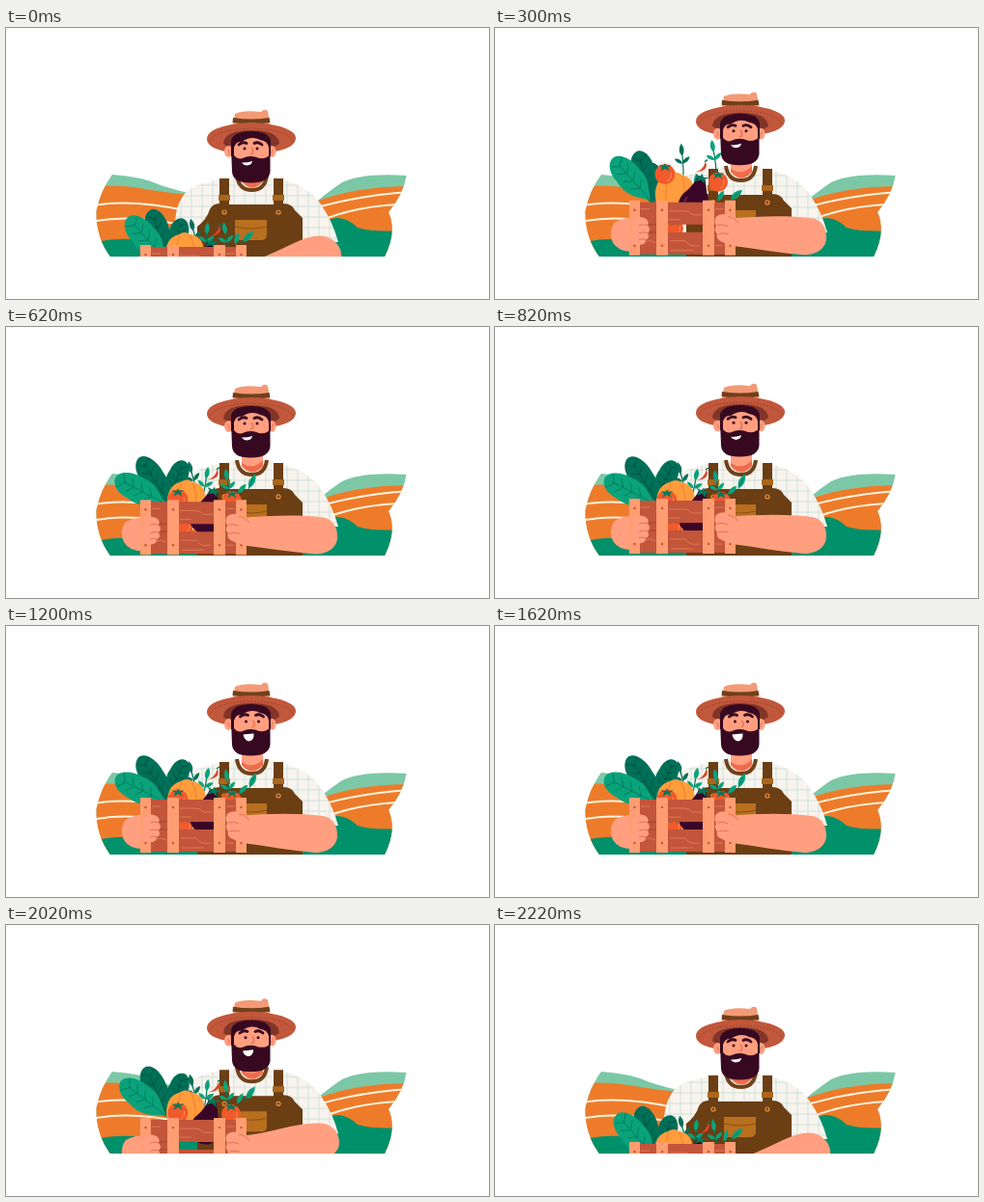
An HTML page that plays this animation: 500 by 281 pixels, repeating every 2420 ms.

```html
<!DOCTYPE html>
<html lang="en">
<head>
<meta charset="utf-8">
<title>Farmer with a crate</title>
<style>
  html, body { margin: 0; width: 100%; height: 100%; overflow: hidden; background: #fff; }
  svg { display: block; width: 100vw; height: 100vh; }
</style>
</head>
<body>
<svg viewBox="0 0 500 281">
  <defs>
    <clipPath id="ground"><rect width="500" height="237"/></clipPath>
    <clipPath id="leftField"><path d="M110 152Q141 154 160 163Q200 176 230 176V237H108Q93 217 93.500 190Q98 168 110 152Z"/></clipPath>
    <clipPath id="rightField"><path d="M240 237V190H310Q330 172 348 160Q370 150 414.500 153Q412 171 396 191Q405 211 392 237Z"/></clipPath>
    <pattern id="check" width="11" height="11" x="177" y="158" patternUnits="userSpaceOnUse">
      <rect width="11" height="11" fill="#f8f4ed"/>
      <path d="M4 0V11M0 5H11" stroke="#cbdedb" stroke-width=".9"/>
    </pattern>
  </defs>

  <g clip-path="url(#ground)">
    <g clip-path="url(#leftField)">
      <path d="M80 140H240V240H80Z" fill="#7cc8a6"/>
      <path d="M80 165Q115 161 150 168Q190 174 230 176V240H80Z" fill="#ee7b2a"/>
      <path d="M90 184Q130 177 190 190M88 201Q130 192 190 206" fill="none" stroke="#fff3dc" stroke-width="2"/>
      <path d="M80 225Q112 216 140 220Q180 215 230 215V240H80Z" fill="#00906a"/>
    </g>
    <g clip-path="url(#rightField)">
      <path d="M240 140H420V240H240Z" fill="#7cc8a6"/>
      <path d="M240 195L318 181Q362 164 420 164V240H240Z" fill="#ee7b2a"/>
      <path d="M300 193Q355 174 420 170M310 207Q350 186 405 183" fill="none" stroke="#fff3dc" stroke-width="2"/>
      <path d="M240 215H315Q329 197 344 197Q355 198 364 207Q380 212 410 210V240H240Z" fill="#00906a"/>
    </g>

    <g id="torso">
      <path d="M236 154Q204 159 190 167Q177 177 175 200V225H200V255H307V222H344Q338 200 326 183Q314 165 289 158L272 154Z" fill="url(#check)"/>
      <path d="M244 135H266V159Q255 172 244 159Z" fill="#ff9f80"/>
      <path d="M244 156Q256 164 266 153V159Q255 172 244 159Z" fill="#ee6c4b"/>
      <path d="M239 153Q241 168 254.500 168Q268 168 270 153" fill="none" stroke="#70421a" stroke-width="4"/>
      <path d="M221 156H231V183H277V156H287V182Q296 182 299 189L307 197V260H198V206Q208 198 211 188Q214 182 221 182Z" fill="#6b3e14"/>
      <path d="M220 173H232V179H220ZM276 173H288V179H276Z" fill="#a9661d"/>
      <path d="M237 199H270V214Q270 220 264 220H243Q237 220 237 214Z" fill="#b86f1e"/>
      <path d="M237 206Q254 210 270 206" fill="none" stroke="#8b5118"/>
      <g fill="#6b3e14" stroke="#f0913d" stroke-width="1.200">
        <circle cx="226" cy="191" r="2"/><circle cx="282" cy="191" r="2"/>
      </g>
    </g>

    <g id="head">
      <path d="M234 79L237 63Q245 59 264 61Q267 57 271 60L274 79Z" fill="#f39a76"/>
      <path d="M235 67Q254 70 272.500 67L273.500 72Q254 75 234.500 72Z" fill="#70401b"/>
      <path d="M234 74Q254 70 274 74C291 77 300 82 300 88C300 98 282 104 254 104C226 104 208 99 208 89C208 82 217 77 234 74Z" fill="#c1573b"/>
      <path d="M211 91Q218 79 254 78Q290 79 297 91" fill="none" stroke="#93412f" stroke-width=".8" stroke-dasharray="2 1.500"/>
      <path d="M225 94Q226 80 254 80Q282 80 283 94Q270 104 254 104Q236 104 225 94Z" fill="#813528"/>
      <g id="ears" fill="#ff9f80">
        <ellipse cx="230.500" cy="102" rx="4.500" ry="6"/><ellipse cx="275.500" cy="102" rx="4" ry="6"/>
        <path d="M229 100Q232 101 231 105M277 100Q274 101 275 105" fill="none" stroke="#e56a4d" stroke-width=".9"/>
      </g>
      <path d="M233 107V91Q235 81 254 81Q272 81 274 91V107Z" fill="#370920"/>
      <path d="M236 110V98Q238 91 244 92Q254 85 263 90Q271 91 272 98V115H236Z" fill="#ff9f80"/>
      <path d="M233 98L236 106Q240 111 245 109Q253 105 262 109Q270 110 273.500 105V123Q272 134.500 254 134.500Q235 135 234 123Z" fill="#370920"/>
      <g id="face">
        <g id="brows" fill="none" stroke="#370920" stroke-width="2.800" stroke-linecap="round">
          <path d="M241 95Q245 91.500 249 93.500M257 93.500Q261 91.500 265 95"/>
        </g>
        <g id="eyes" fill="#370920"><circle cx="247" cy="99" r="1.500"/><circle cx="260" cy="99" r="1.500"/></g>
        <path d="M254 98Q258 104 253 105" fill="none" stroke="#e5654a" stroke-width="1.200"/>
        <path id="mouth" fill="#fff"/>
      </g>
    </g>

    <g id="veg"></g>
    <g id="crate"></g>
    <path id="forearm" fill="#ff9f80"/>
    <g id="hand" fill="#ff9f80">
      <path d="M229 16Q233 12 240 14L258 21V45Q244 47 235 42Q228 39 230 34Q226 30 229 26Q226 20 229 16Z"/>
      <path d="M230 25Q236 23 241 26M231 34Q236 32 242 34M241 16Q249 17 252 23" fill="none" stroke="#e4704f"/>
    </g>
  </g>
</svg>
<script>
const LOOP = 2420;
const $ = id => document.getElementById(id);

// [time, value] steps
const crateY = [[220, 226], [300, 180], [400, 159], [460, 161], [570, 177], [650, 181], [740, 179],
  [1620, 179], [1850, 167], [1880, 168], [2000, 195], [2120, 227], [2220, 226]];
const headY = [[220, 26], [300, 8], [410, -4], [460, -3], [620, 1], [740, 0],
  [1620, 0], [1760, -1], [1880, 2], [2000, 15], [2110, 27], [2220, 26]];
const rise = [[220, 0], [300, 10], [420, 16], [460, 15.5], [740, 15], [1620, 15], [1880, 13.5], [2000, 7], [2130, -.5], [2220, 0]];
const smile = [[800, 0], [1060, 1], [1960, 1], [2120, 0]];
const lids = [[830, 1], [900, .1], [940, .1], [1010, 1]];
const nod = [[760, 0], [920, 1.5], [1100, -.5], [1200, 0]];
const hop = [[1880, 0], [2010, -13], [2130, 1], [2220, 0]];
const vegTimes = [220, 300, 460, 650, 1900, 2140];

// Smooth curve through the steps that never overshoots them
function at(steps, t) {
  const n = steps.length - 1;
  if (t <= steps[0][0]) return steps[0][1];
  if (t >= steps[n][0]) return steps[n][1];
  const i = steps.findIndex(s => s[0] > t) - 1;
  const rate = k => k < 0 || k >= n ? 0 : (steps[k + 1][1] - steps[k][1]) / (steps[k + 1][0] - steps[k][0]);
  const slope = k => {
    const a = rate(k - 1), b = rate(k);
    return a * b <= 0 ? 0 : 2 * a * b / (a + b);
  };
  const [t0, v0] = steps[i], [t1, v1] = steps[i + 1], d = t1 - t0, u = (t - t0) / d;
  const w = u * u * (3 - 2 * u);
  return v0 + (v1 - v0) * w + d * u * (1 - u) * (slope(i) * (1 - u) - slope(i + 1) * u);
}

function leaf(len, w, fill, vein) {
  let ribs = `M0 0V${-len * .85}`;
  for (let k = .3; k < .85; k += .17)
    ribs += `M${-w * .6} ${-len * (k + .1)}L0 ${-len * k}L${w * .6} ${-len * (k + .1)}`;
  return `<path d="M0 0C${-w * .4} ${-len * .2} ${-w * 1.3} ${-len * .3} ${-w} ${-len * .65}` +
    `C${-w} ${-len * .9} ${-w * .4} ${-len} 0 ${-len}C${w * .6} ${-len} ${w * 1.1} ${-len * .8} ${w} ${-len * .55}` +
    `C${w * 1.1} ${-len * .3} ${w * .4} ${-len * .2} 0 0Z" fill="${fill}"/>` +
    `<path d="${ribs}" fill="none" stroke="${vein}" stroke-width=".8"/>`;
}

const star = (y, s) => `<path transform="translate(0 ${y}) scale(${s})" fill="#007a5b"
  d="M0 -4L1.500 -1L7 -2L3 1L5 5L0 2L-5 5L-3 1L-7 -2L-1.500 -1Z"/>`;
const tomato = r => `<circle r="${r}" fill="#f2592b"/>
  <path d="M${r * .6} ${-r * .2}Q${r * .7} ${r * .4} ${r * .2} ${r * .7}" fill="none" stroke="#ff8a55"/>${star(-r * .75, r / 11)}`;
const sprout = (x, y, a, s, fill) => `<path transform="translate(${x} ${y}) rotate(${a}) scale(${s})" fill="${fill}"
  d="M0 0Q-5 -6 0 -13Q5 -6 0 0Z"/>`;
const sprig = fill => `<path d="M0 0Q1 -14 0 -24" fill="none" stroke="#00755a" stroke-width="1.200"/>` +
  sprout(0, -20, 0, 1, fill) + sprout(0, -12, -55, .75, fill) + sprout(0, -12, 50, .8, fill);

const DARK = '#007058', LIGHT = '#0aa27b';
// Poses: x, height against the crate rim, angle; resting low, tossed, airborne, settled
const veg = [
  [leaf(42, 10, DARK, '#00533f'), [172, 12, 15], [165, 2, -4], [164, -20, 8], [168, -2, 25]],
  [leaf(58, 12, DARK, '#00533f'), [166, 18, -15], [163, 4, -15], [168, -20, -33], [170, 5, -33]],
  [leaf(60, 13, LIGHT, '#00795c'), [166, 15, -42], [162, 0, -42], [159, -14, -49], [167, 5, -63]],
  [sprig(DARK), [198, 4, -12], [195, -27, -4], [195, -41, -10], [197, -7, -14]],
  [sprig(LIGHT), [206, 8, 5], [206, 4, 5], [206, -46, -8], [203, 0, 12]],
  [sprig(LIGHT), [230, 8, -8], [229, -31, -8], [231, -42, -8], [232, 2, -8]],
  [`<path d="M-6 5Q2 4 5 -6Q9 4 -6 5Z" fill="#d94427"/><path d="M4 -6L7 -8" stroke="#007a5b" stroke-width="1.500"/>`,
    [216, -15, 0], [213, -35, 0], [213, -53, 0], [214, -25, 0]],
  [tomato(9), [186, 22, 0], [186, 28, 0], [184, -7, 0], [185, 28, 0]],
  [`<path d="M-6 -18Q0 -22 6 -18Q20 -16 20 2Q20 20 0 21Q-20 20 -20 2Q-19 -15 -6 -18Z" fill="#ff9c3d"/>
    <path d="M-5 -17Q-13 0 -5 20M6 -17Q14 0 6 20" fill="none" stroke="#f0802c"/>`,
    [185, 6, 0], [186, -10, 5], [186, -27, 20], [187, 0, 0]],
  [`<path d="M-4 -23Q4 -25 6 -17Q9 -8 14 0Q20 14 8 22Q-4 27 -13 18Q-20 7 -12 -4Q-6 -12 -4 -23Z" fill="#3a0628"/>
    <path d="M-9 1Q-13 8 -9 15" fill="none" stroke="#6d2750" stroke-width="1.500"/>${star(-22, 1.1)}`,
    [208, 18, 12], [208, -3, 15], [204, -22, 24], [209, 13, 16]],
  [tomato(10.5), [178, 12, 0], [176, -28, 0], [177, -37, -10], [178, 1, 0]],
  [tomato(10), [232, 13, 0], [231, -20, 0], [231, -29, 8], [234, 2, 0]],
  [sprout(0, 7, 0, 1.25, LIGHT) + `<path d="M0 10V-5" stroke="#00795c" stroke-width=".8"/>`,
    [250, -9, 45], [249, -6, 50], [244, -42, 30], [255, -18, 25]],
  [sprout(0, 7, 0, 1, LIGHT), [239, -8, 15], [234, -6, 30], [225, -57, -15], [246, -10, 45]],
];
$('veg').innerHTML = veg.map(v => `<g>${v[0]}</g>`).join('');
const vegNodes = [...$('veg').children];
const tracks = veg.map(([, low, toss, air, rest]) => [0, 1, 2].map(k =>
  [low, toss, air, rest, rest, low].map((p, i) => [vegTimes[i], p[k]])));

const slats = [[139, 11], [167, 12], [215, 12], [238, 11]];
$('crate').innerHTML = `
  <path d="M124 22Q136 15 150 18V50Q141 54 130 50Q119 44 120 33Q120 27 124 22Z" fill="#ff9f80"/>
  <path d="M140 1H248V55H140ZM179 24V32H215V24Z" fill="#c2553a" fill-rule="evenodd"/>
  <path d="M151 8H160M153 43Q160 39 166 43M180 10H196Q202 10 204 14H214M180 19H192M181 41H197Q201 48 212 46M182 51H205M228 8H237M228 46H236"
    fill="none" stroke="#e17d58" stroke-width=".9"/>
  <path d="M140 24H179M215 24H248M140 32H179M215 32H248" stroke="#9d4030" stroke-width=".8"/>` +
  slats.map(([x, w]) => `<rect x="${x}" y="-1" width="${w}" height="57" fill="#ff9d72"/>` +
    [9, 46].map(y => `<circle cx="${x + w / 2}" cy="${y}" r="1.200" fill="#c2553a"/>`).join('')).join('') + `
  <path d="M143 20Q149 14 156 18Q160 21 158 25Q162 29 158 33Q161 38 156 40Q156 46 148 45L140 43Z" fill="#ff9f80"/>
  <path d="M149 25Q154 23 158 25M149 33Q154 31 158 33M149 40Q153 38 156 40" fill="none" stroke="#e4704f"/>`;

const move = (id, x, y) => $(id).setAttribute('transform', `translate(${x} ${y})`);

function forearm(c) {
  const e = 215 + (c - 179) * .4, x = 343 + (c - 179) * .09;
  return `M240 ${c + 18}C275 ${c + 15} 305 ${e - 21} 328 ${e - 18}C338 ${e - 17} ${x} ${e - 8} ${x} ${e + 2}` +
    `C${x} ${e + 13} 333 ${e + 20} 320 ${e + 20}C295 ${e + 18} 270 ${c + 49} 245 ${c + 46}Z`;
}

function draw(t) {
  const c = at(crateY, t), m = at(smile, t), n = at(nod, t), lid = at(lids, t), lift = at(hop, t);
  move('torso', 0, -at(rise, t));
  move('head', 0, at(headY, t));
  move('ears', 0, n);
  move('face', m * 1.5, n * .7);
  move('brows', 0, -m);
  $('eyes').setAttribute('transform', `translate(0 ${99 * (1 - lid)}) scale(1 ${lid})`);
  $('mouth').setAttribute('d', `M244 ${113.500 - m}Q249 ${114 - m * 2} 255 ${112 - m * .5}` +
    `Q${254.500 + m} ${116 + m * 3} ${249.500 + m * .5} ${116.500 + m * 3}Q${246 - m} ${116.500 + m * 2} 244 ${113.500 - m}Z`);
  vegNodes.forEach((node, i) => {
    const [x, y, a] = tracks[i].map(s => at(s, t));
    node.setAttribute('transform', `translate(${x} ${c + y + lift}) rotate(${a})`);
  });
  move('crate', 0, c);
  move('hand', 0, c);
  $('forearm').setAttribute('d', forearm(c));
}

const start = performance.now();
function tick() {
  draw((performance.now() - start) % LOOP);
  requestAnimationFrame(tick);
}
tick();
</script>
</body>
</html>
```
